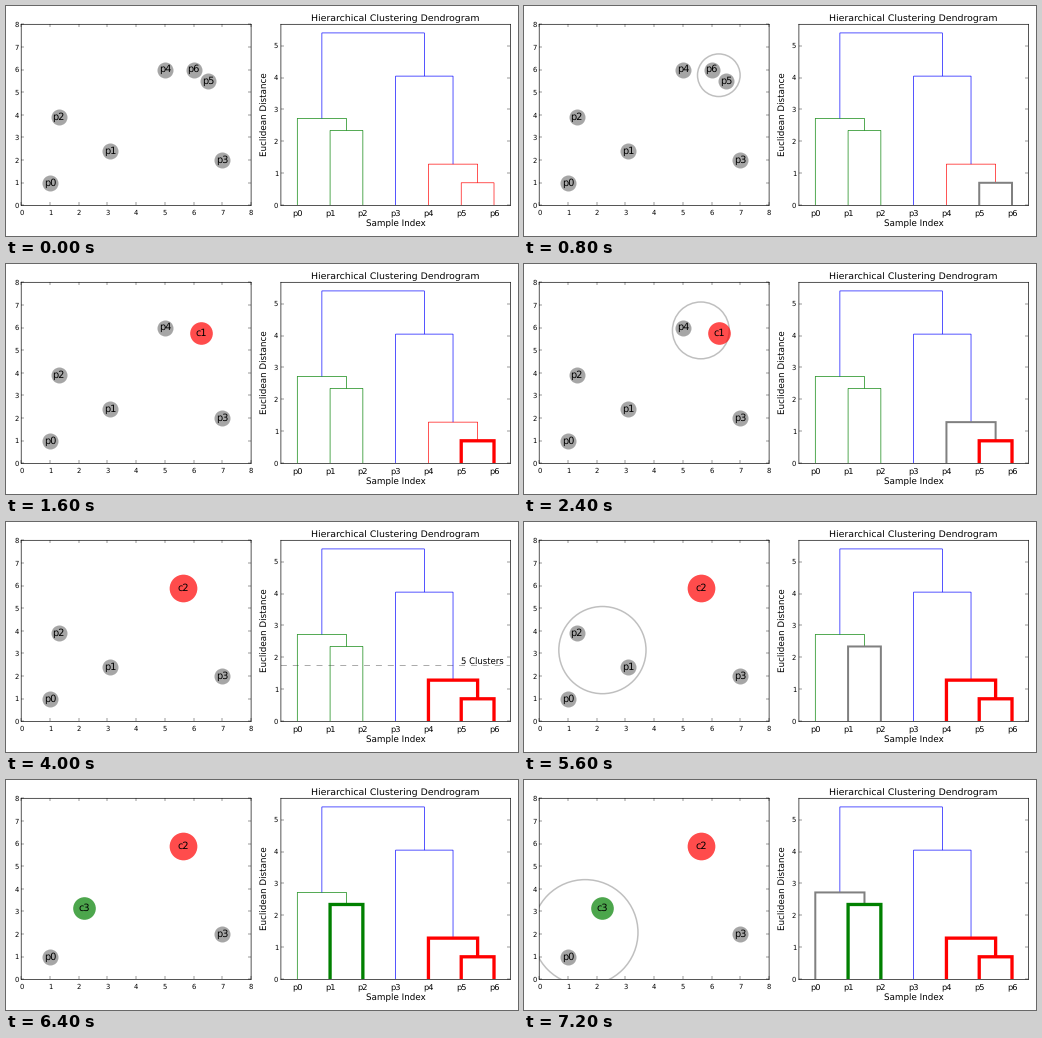
Recreate the animation shown at these times as a matplotlib script. Size 512 px wide and 230 px high, loop 8000 ms.

```python
import matplotlib.pyplot as plt
import numpy as np
from matplotlib.animation import FuncAnimation

W, H, DPI = 512, 230, 64
PT = 72 / DPI  # points per pixel

plt.rcParams.update({
    "font.family": "DejaVu Sans",
    "text.hinting": "none",
    "axes.linewidth": 0.66 * PT,
})

POINTS = {
    "p0": (1, 1), "p1": (3.1, 2.4), "p2": (1.3, 3.9), "p3": (7, 2),
    "p4": (5, 6), "p5": (6.5, 5.5), "p6": (6, 6),
}
LEAVES = list(POINTS)
RED, GREEN, BLUE, GRAY = (1, 0, 0), (0, 0.5, 0), (0, 0, 1), (0.5, 0.5, 0.5)

# name, left child, right child, link colour, ring radius in pixels
MERGES = [
    ("c1", "p5", "p6", RED, 21.3),
    ("c2", "p4", "c1", RED, 28.4),
    ("c3", "p1", "p2", GREEN, 43.6),
    ("c4", "p0", "c3", GREEN, 52.8),
    ("c5", "p3", "c2", BLUE, 0),
    ("c6", "c4", "c5", BLUE, 0),
]

# finished merges, ring shown, cut line shown
STEPS = [
    (0, False, False), (0, True, False),
    (1, False, False), (1, True, False),
    (2, False, False), (2, False, True), (2, False, True),
    (2, True, False), (3, False, False), (3, True, False),
]


class Node:
    def __init__(self, center, members, x, height=0.0):
        self.center = np.array(center, float)
        self.members = members
        self.x = x
        self.height = height


def average_distance(a, b):
    return np.mean([np.hypot(*np.subtract(POINTS[p], POINTS[q]))
                    for p in a.members for q in b.members])


def pixel_axes(left, top, right, bottom):
    return fig.add_axes([left / W, 1 - bottom / H,
                         (right - left) / W, (bottom - top) / H])


def style_ticks(ax, axis, **options):
    ax.tick_params(axis=axis, direction="in", top=True, right=True,
                   width=0.4 * PT, **options)


def disc(node, color):
    radius = 8 * np.sqrt(len(node.members))
    return space.scatter(*node.center, s=(2 * radius * PT) ** 2, color=[color],
                         alpha=0.7, linewidths=0, zorder=3)


def ring(center, radius):
    return space.scatter(*center, s=(2 * radius * PT) ** 2, facecolors="none",
                         edgecolors=[GRAY], alpha=0.5, linewidths=1.5 * PT,
                         zorder=2)


def tag(node, name):
    return space.text(*node.center, name, size=9.8 * PT,
                      ha="center", va="center", zorder=4)


fig = plt.figure(figsize=(W / DPI, H / DPI), dpi=DPI, facecolor="white")

space = pixel_axes(15.2, 18.3, 245.1, 199.4)
space.set(xlim=(0, 8), ylim=(0, 8), xticks=range(9), yticks=range(9))
style_ticks(space, "x", length=2.7 * PT, labelsize=6.8 * PT, pad=4.4 * PT)
style_ticks(space, "y", length=2.7 * PT, labelsize=6.8 * PT, pad=2.7 * PT)

nodes = {name: Node(xy, [name], 5 + 10 * i)
         for i, (name, xy) in enumerate(POINTS.items())}
for name, a, b, _, _ in MERGES:
    a, b = nodes[a], nodes[b]
    nodes[name] = Node((a.center + b.center) / 2, a.members + b.members,
                       (a.x + b.x) / 2, average_distance(a, b))

tree = pixel_axes(274.9, 18.3, 504.4, 199.4)
tree.set(xlim=(0, 70), ylim=(0, 1.05 * nodes["c6"].height), yticks=range(6))
tree.set_xticks([nodes[leaf].x for leaf in LEAVES], LEAVES)
style_ticks(tree, "x", length=0, labelsize=8.2 * PT, pad=4.6 * PT)
style_ticks(tree, "y", length=2.7 * PT, labelsize=6.8 * PT, pad=2.7 * PT)

for x, y, text, size, angle in [
    (389.7, 15.2, "Hierarchical Clustering Dendrogram", 9.32, 0),
    (390, 220, "Sample Index", 8.8, 0),
    (263.2, 108.5, "Euclidean Distance", 8.7, 90),
]:
    fig.text(x / W, 1 - y / H, text, size=size * PT, rotation=angle,
             ha="right" if angle else "center",
             va="center" if angle else "baseline")

links = []
for name, a, b, color, _ in MERGES:
    a, b, top = nodes[a], nodes[b], nodes[name].height
    line, = tree.plot([a.x, a.x, b.x, b.x], [a.height, top, top, b.height],
                      solid_joinstyle="miter", solid_capstyle="butt")
    links.append(line)

cut_line = tree.axhline(1.75, color=GRAY, lw=0.66 * PT, zorder=1)
cut_line.set_linestyle((0, (9, 9)))
cut_text = tree.text(68.1, 1.79, "5 Clusters", size=8.55 * PT,
                     ha="right", va="baseline")

# Each node on the left: its disc, its label and the merge that absorbs it.
marks = []
for name in LEAVES + [m[0] for m in MERGES[:3]]:
    born = next((i + 1 for i, m in enumerate(MERGES) if m[0] == name), 0)
    gone = next(i for i, m in enumerate(MERGES) if name in m[1:3])
    color = MERGES[born - 1][3] if born else GRAY
    marks.append((born, gone, disc(nodes[name], color),
                  tag(nodes[name], name)))

rings = [ring(nodes[m[0]].center, m[4]) for m in MERGES[:4]]

# Keep thin lines at their exact subpixel positions.
for artist in links + [cut_line, *space.spines.values(),
                       *tree.spines.values()]:
    artist.set_snap(False)


def draw(frame):
    done, ringed, cut = STEPS[frame]
    for born, gone, *artists in marks:
        for artist in artists:
            artist.set_visible(born <= done <= gone)
    for i, circle in enumerate(rings):
        circle.set_visible(ringed and i == done)
    for i, (line, merge) in enumerate(zip(links, MERGES)):
        if i < done:
            line.set(color=merge[3], linewidth=3.3 * PT, zorder=4)
        elif ringed and i == done:
            line.set(color=GRAY, linewidth=2 * PT, zorder=3)
        else:
            line.set(color=merge[3], linewidth=0.66 * PT, zorder=2)
    cut_line.set_visible(cut)
    cut_text.set_visible(cut)
    return []


animation = FuncAnimation(fig, draw, frames=len(STEPS), interval=800,
                          init_func=lambda: draw(0), repeat=True,
                          repeat_delay=0, blit=False)
plt.show()
```
